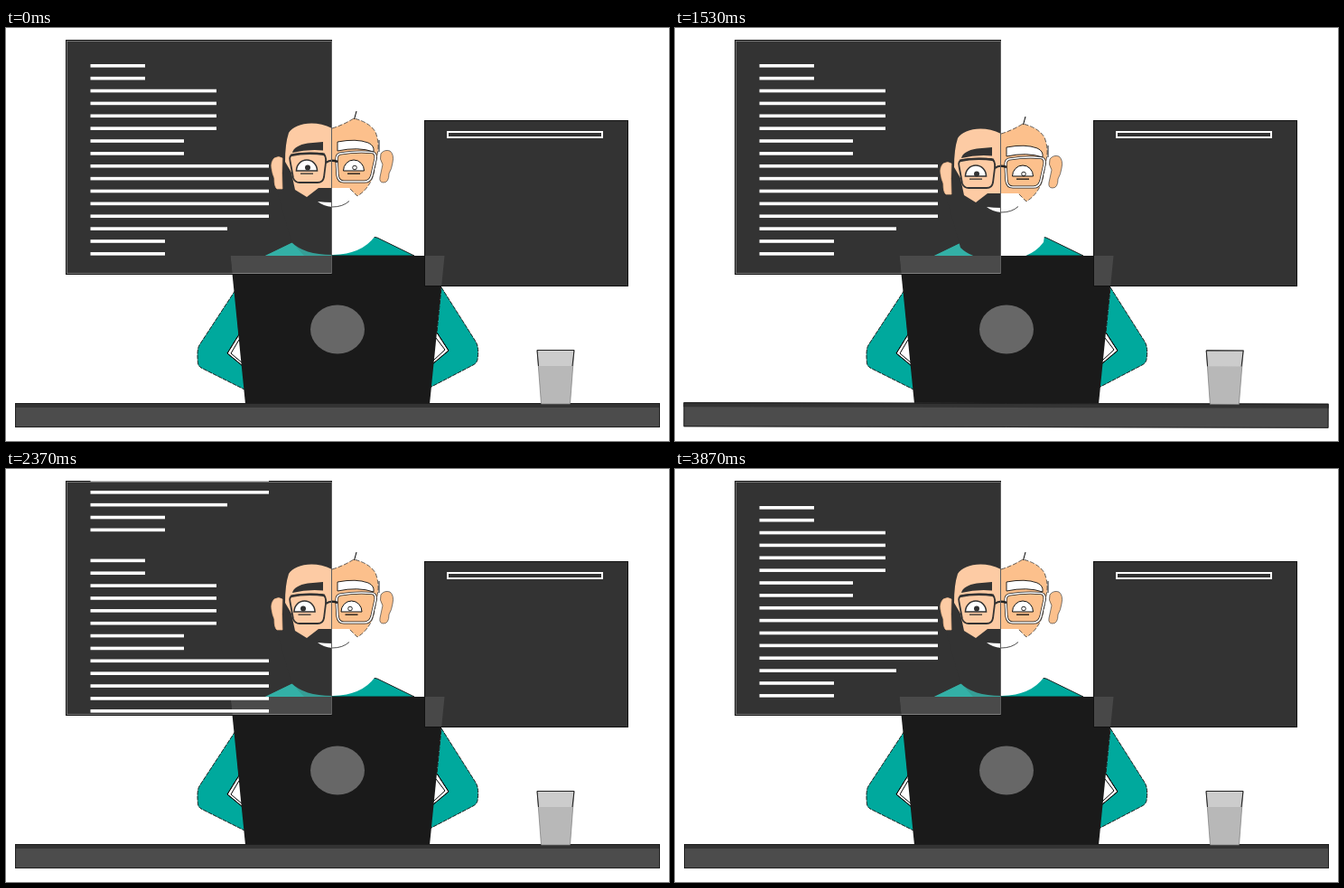
These frames come from a looping animation (734x457 px, 4140 ms). An HTML page with a canvas:

```html
<!DOCTYPE html>
<html lang="en">
<head>
<meta charset="utf-8">
<title>Man at a laptop</title>
<style>
html, body { margin: 0; width: 100%; height: 100%; overflow: hidden; background: #fff; }
canvas { display: block; }
</style>
</head>
<body>
<canvas id="stage" width="734" height="457"></canvas>
<script>
const ctx = document.getElementById('stage').getContext('2d');
const LOOP = 4140, STEP = 30, SPLIT = 361;
const TEAL = '#00a99d', DARK = '#333', LAPTOP = '#1a1a1a';

// Tracks: [time, value] pairs joined by sine easing
const tracks = {
  head: [[60, 0], [450, 6], [1650, 6], [1890, 0]],
  desk: [[240, 0], [510, .32], [780, 1], [1080, -.4], [1140, -.4], [1380, .4],
         [1530, .13], [1620, 0], [1770, -1], [1920, -.55], [2130, 0]],
  scroll: [[1723, 0], [2686, -241]],
  lookX: [[1680, 0], [1860, -4], [2250, -5], [2610, -5], [2850, 1], [3060, 4], [3480, 4], [3840, 0]],
  lookY: [[240, 0], [480, 1], [1650, 1], [1860, 0]],
  brow: [[1650, 0], [1900, -1]],
  fold: [[3420, 1], [3870, 0]]
};
const ease = p => (1 - Math.cos(Math.PI * p)) / 2;
const clamp = p => Math.min(1, Math.max(0, p));

function at(name, t) {
  const keys = tracks[name];
  if (t <= keys[0][0]) return keys[0][1];
  for (let i = 1; i < keys.length; i++) {
    const [a, from] = keys[i - 1], [b, to] = keys[i];
    if (t < b) return from + (to - from) * ease((t - a) / (b - a));
  }
  return keys[keys.length - 1][1];
}

const P = d => new Path2D(d);
const shape = {
  shirt: P('M287 252L318 237Q363 220 406 231L411 232L452 252Z'),
  shade: P('M287 252L317 237.5L330 252Z'),
  beard: P('M300 180L316 237Q330 251 362 251Q394 250 408 231L415 180Z'),
  skin: P('M309 148Q309 128 313 116C319 106 341 101 361 111Q374 107 385 100Q402 104 409 115Q414 128 411 140L407 162Q402 178 389 186L380 177H346L333 187L320 179L316 160Z'),
  browL: P('M317 138Q319 130 334 127.5L351 126V135.5Q334 134 317 138Z'),
  browR: P('M367 126Q388 122 401 127Q408 130 407 137Q390 131 367 136Z'),
  lensL: P('M318 140Q332 138 350 139Q355 140 354 149L352 165Q351 171 345 171H325Q320 171 318 166L314.500 147Q313 141 318 140Z'),
  lensR: P('M370 139Q388 136 405 137.500Q410 138 409 145L405 163Q403 170 397 170H374Q368 170 367 163L366 145Q366 140 370 139Z'),
  bridge: P('M354 149Q360 145 367 148'),
  earL: P('M306 144Q302 141 297 144Q293 148 294 155Q295 162 297 166Q297 176 300 178H306Q305 160 306 144Z'),
  earR: P('M415 139Q419 134 425 136Q430 140 428 149Q427 156 424 161Q424 171 418 171Q413 171 414 165L417 151Q413 145 415 139Z'),
  mouth: P('M345 192Q363 194 380 191.500Q373 198 361 198Q351 197 345 192Z'),
  wisp: P('M385.500 101L388 92'),
  headEdge: P('M361 111Q374 107 385 100Q402 104 409 115Q414 128 411 140L407 162Q402 178 389 186L380 177'),
  laptop: P('M248.500 252H485.500L469 416H265Z'),
  armL: P('M254 290L214 351Q211 356 212.500 371Q213 375 218 377L266 401L262 374L245 360L258 339Z'),
  armR: P('M482 287L520 347Q524 353 522 367Q521 371 517 373L469 398L472 372L490 357L477 337Z'),
  cuffL: P('M258 339L245 360L262 374M258 345L249 360L262 371'),
  cuffR: P('M477 337L490 357L472 372M476 343L486 356L473 368'),
  glass: P('M588 356.500H629L624.500 416H592.500Z')
};

function fill(path, color) {
  ctx.fillStyle = color;
  ctx.fill(path);
}
function line(path, color = '#000', width = 1, dash = []) {
  ctx.strokeStyle = color;
  ctx.lineWidth = width;
  ctx.setLineDash(dash);
  ctx.stroke(path);
  ctx.setLineDash([]);
}
function box(x, y, w, h, color) {
  ctx.fillStyle = color;
  ctx.fillRect(x, y, w, h);
}
function frame(x, y, w, h, color, width = 1) {
  ctx.strokeStyle = color;
  ctx.lineWidth = width;
  ctx.strokeRect(x, y, w, h);
}
function scoped(draw) {
  ctx.save();
  draw();
  ctx.restore();
}
function clipBox(x, y, w, h) {
  ctx.beginPath();
  ctx.rect(x, y, w, h);
  ctx.clip();
}
function turn(deg, x, y) {
  ctx.translate(x, y);
  ctx.rotate(deg * Math.PI / 180);
  ctx.translate(-x, -y);
}

const rowEnds = [154, 154, 233, 233, 233, 233, 197, 197, 291, 291, 291, 291, 291, 245, 176, 176];

function codeRows(t) {
  scoped(() => {
    clipBox(67, 13, 294, 258);
    const top = 40 + at('scroll', t);
    for (const copy of [0, 242])
      rowEnds.forEach((end, i) => box(93.5, top + copy + i * 13.87, end - 93.5, 3.6, '#fff'));
  });
}

// Each wireframe box: x, y, width, height, start time
const boxes = [[490, 128, 169, 43, 2790], [585, 184, 75, 45, 2790], [490, 184, 84, 88, 2910]];

function wirePanel(t) {
  frame(463.5, 102.5, 225, 183, '#111');
  frame(489, 115, 171, 6, '#fff', 2);
  const fold = at('fold', t);
  if (fold <= 0) return;
  for (const [x, y, w, h, start] of boxes) {
    const grow = ease(clamp((t - start) / 510));
    if (grow <= 0) continue;
    scoped(() => {
      ctx.translate(x, 127 + (y - 127) * fold);
      ctx.scale(grow, fold);
      frame(0, 0, w, h, '#fff', 2);
    });
  }
}

function eye(x, dx, dy, left) {
  x += dx / 2;
  const dome = P(`M${x - 11.5} 158A11.500 12 0 0 1 ${x + 11.5} 158Z`);
  fill(dome, '#fff');
  line(dome, left ? DARK : '#111', left ? 1.6 : 1);
  ctx.beginPath();
  ctx.arc(x + 1 + dx / 2, 154.5 + dy, left ? 3 : 2.3, 0, 7);
  if (left) {
    ctx.fillStyle = DARK;
    ctx.fill();
  } else {
    ctx.lineWidth = .9;
    ctx.stroke();
  }
  box(x - 7, 160.5, 14, 1.3, left ? DARK : '#111');
}

function person(t, left) {
  const skin = left ? '#fdcba4' : '#fcc08c';
  const gap = left ? DARK : '#fff';
  scoped(() => {
    clipBox(left ? 0 : SPLIT, 0, left ? SPLIT : 734, 252);
    fill(shape.shirt, left ? '#369e96' : TEAL);
    if (left) fill(shape.shade, '#33b0a6');
    else line(shape.shirt, '#111', .9);
    ctx.translate(0, at('head', t));
    fill(shape.beard, gap);
    fill(left ? shape.earL : shape.earR, skin);
    line(left ? shape.earL : shape.earR, left ? '#f3b98b' : '#444', .7);
    fill(shape.skin, skin);
    if (!left) {
      line(shape.headEdge, '#222', .7, [5, 2]);
      line(shape.wisp);
      line(P('M413 124V137'), '#222', 1);
    }
    eye(left ? 333 : 385, at('lookX', t), at('lookY', t), left);
    if (left) {
      line(shape.lensL, DARK, 1.8);
      line(P('M315 141Q333 137 353 140'), DARK, 2.4);
      line(shape.bridge, DARK, 2.2);
    } else {
      line(shape.lensR, '#222', 3.2);
      line(shape.lensR, '#fff', 1.7);
      line(shape.bridge, '#222', 2.5);
    }
    fill(shape.mouth, '#fff');
    if (!left) line(P('M361 198Q373 198 380 191.500'), '#222', .8);
    ctx.translate(0, at('brow', t));
    fill(left ? shape.browL : shape.browR, gap);
    if (!left) line(shape.browR, '#111', .9);
  });
}

function laptop() {
  for (const side of ['L', 'R']) {
    fill(shape['arm' + side], TEAL);
    line(shape['arm' + side], '#111', .9, [5, 1]);
    line(shape['cuff' + side], '#000', 1);
  }
  fill(shape.laptop, LAPTOP);
  ctx.fillStyle = '#676767';
  ctx.beginPath();
  ctx.ellipse(367, 333.5, 30, 27, 0, 0, 7);
  ctx.fill();
}

// The laptop shows faintly through both panels
function overlaps() {
  scoped(() => {
    ctx.clip(shape.laptop);
    box(240, 252, 121, 20, '#4a4a4a');
    box(463, 252, 30, 33.5, '#484848');
  });
}

function desk(t) {
  const tilt = at('desk', t);
  scoped(() => {
    turn(tilt, 367, 228);
    box(10, 415, 714, 27, '#4c4c4c');
    box(10, 415, 714, 5, DARK);
    frame(10.5, 415.5, 713, 26, '#1c1c1c', .9);
  });
  scoped(() => {
    ctx.translate(0, tilt * 3.5);
    turn(tilt * 2.5, 608, 390);
    fill(shape.glass, '#b8b8b8');
    scoped(() => {
      ctx.clip(shape.glass);
      box(585, 356, 46, 18, '#ccc');
    });
    line(shape.glass, '#777', .7);
    line(P('M588 356.500H629L627 374M588 356.500L589.500 374'), '#222', 1);
  });
}

function draw(t) {
  box(0, 0, 734, 457, '#fff');
  box(67, 14, 294, 258, DARK);
  person(t, true);
  person(t, false);
  laptop();
  box(463, 102, 225.5, 183.5, DARK);
  overlaps();
  frame(66.5, 13.5, 294, 259, '#111');
  frame(67.5, 14.5, 293, 257, 'rgba(190,190,190,.45)');
  codeRows(t);
  wirePanel(t);
  desk(t);
}

function tick() {
  const t = performance.now() % LOOP;
  draw(Math.floor(t / STEP) * STEP);
  requestAnimationFrame(tick);
}
tick();
</script>
</body>
</html>
```
